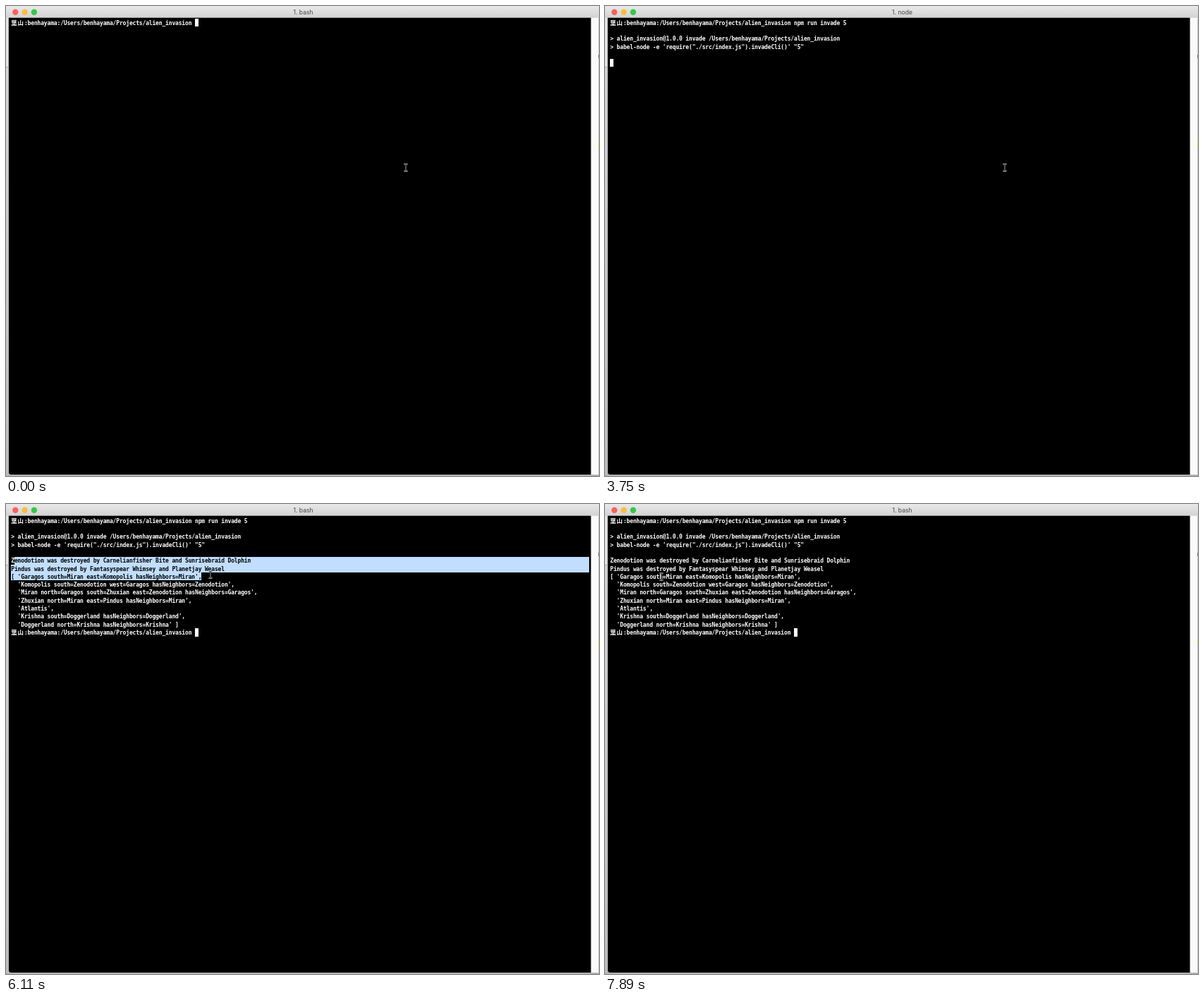
Animation of 841 by 666 pixels, one loop 8000 ms. Source, as an HTML page with a canvas:

```html
<!DOCTYPE html>
<html lang="en">
<head>
<meta charset="utf-8">
<title>Terminal</title>
<style>
  html, body { margin: 0; width: 100%; height: 100%; overflow: hidden; background: #ccc; }
  canvas { display: block; }
</style>
</head>
<body>
<canvas id="stage" width="841" height="666"></canvas>
<script>
const ctx = document.getElementById('stage').getContext('2d');
const LOOP = 8000;
const LEFT = 7.3, TOP = 17.9, CELL = 4.655, ROW = 11.32, RIGHT = 827;
const USER = 'benhayama';
const PATH = `/Users/${USER}/Projects/alien_invasion`;
const PROMPT = `葉山:${USER}:${PATH} `;
const COMMAND = 'npm run invade 5';

const banner = [
  '',
  `> alien_invasion@1.0.0 invade ${PATH}`,
  `> babel-node -e 'require("./src/index.js").invadeCli()' "5"`,
  ''
];
const result = [
  'Zenodotion was destroyed by Carnelianfisher Bite and Sunrisebraid Dolphin',
  'Pindus was destroyed by Fantasyspear Whimsey and Planetjay Weasel',
  "[ 'Garagos south=Miran east=Komopolis hasNeighbors=Miran',",
  "  'Komopolis south=Zenodotion west=Garagos hasNeighbors=Zenodotion',",
  "  'Miran north=Garagos south=Zhuxian east=Zenodotion hasNeighbors=Garagos',",
  "  'Zhuxian north=Miran east=Pindus hasNeighbors=Miran',",
  "  'Atlantis',",
  "  'Krishna south=Doggerland hasNeighbors=Doggerland',",
  "  'Doggerland north=Krishna hasNeighbors=Krishna' ]",
  PROMPT
];

// Pointer stops: time, x, y
const stops = [
  [0, 567, 229], [4200, 567, 240], [4340, 545, 234], [4490, 330, 150],
  [4640, 110, 92], [4780, 30, 76], [4930, 14, 79], [5080, 12, 81],
  [5520, 40, 81], [5670, 100, 83], [5820, 174, 84], [5960, 240, 92],
  [6110, 290, 100], [6260, 310, 103], [6410, 320, 99], [6550, 321, 95.5],
  [6700, 321, 94], [7740, 180, 100], [7890, 80, 103]
];

const isWide = ch => ch > '\u2fff';
const colX = col => Math.min(RIGHT, Math.round(LEFT + col * CELL));
const rowY = row => Math.round(TOP + row * ROW);

function screenLines(t) {
  if (t < 600) return [PROMPT];
  if (t < 1050) return [PROMPT + COMMAND.slice(0, 8)];
  const lines = [PROMPT + COMMAND];
  if (t < 3150) return lines;
  if (t < 3450) return [...lines, ''];
  if (t < 4050) return [...lines, ...banner, ''];
  return [...lines, ...banner, ...result];
}

function pointerAt(t) {
  const i = stops.findLastIndex(s => s[0] <= t);
  const [, x, y] = stops[i];
  const [, px, py] = stops[Math.max(0, i - 1)];
  // The selection trails slightly behind the pointer
  const lag = (a, b) => a + (b - a) * 0.17;
  return { x, y, dragX: lag(x, px), dragY: lag(y, py) };
}

function selectionAt(t, pointer, lines) {
  if (t < 5520 || t >= 7300) return null;
  const row = Math.floor((pointer.dragY - TOP) / ROW);
  const col = Math.floor((pointer.dragX - LEFT) / CELL);
  return { row, col: col > lines[row].length ? Infinity : col };
}

function selectedRange(sel, row) {
  if (!sel || row < 5 || row > sel.row) return [0, 0];
  return [row === 5 ? 1 : 0, row === sel.row ? sel.col : Infinity];
}

function rect(color, x, y, w, h) {
  ctx.fillStyle = color;
  ctx.fillRect(x, y, w, h);
}

function cells(color, row, from, to) {
  const x = colX(from), y = rowY(row);
  rect(color, x, y, colX(to) - x, rowY(row + 1) - y);
}

function gradient(y0, y1, from, to) {
  const g = ctx.createLinearGradient(0, y0, 0, y1);
  g.addColorStop(0, from);
  g.addColorStop(1, to);
  return g;
}

function drawWindow(title) {
  rect('#d2d2d2', 0, 0, 841, 666);
  rect('#e4e4e4', 0, 0, 4, 86);
  rect('#aaa', 0, 86, 4, 1);
  rect(gradient(87, 666, '#d4d4d4', '#bcbcbc'), 0, 87, 4, 579);
  rect('#b4b4b4', 3, 16, 1, 648);
  rect('#b4b4b4', 0, 664, 841, 2);
  rect('#c9c9c9', 840, 16, 1, 648);
  rect('#777', 840, 69, 1, 5);
  rect('#e8cf3c', 840, 193, 1, 7);
  ctx.fillStyle = '#000';
  ctx.beginPath();
  ctx.roundRect(4, 10, 830, 654, [0, 0, 0, 3]);
  ctx.fill();
  rect('#fafafa', 829.6, 16, 10.4, 648);
  rect(gradient(0, 16, '#e9e9e9', '#d3d3d3'), 0, 0, 841, 16.7);
  ['#fc605b', '#fdbc40', '#34c84a'].forEach((color, i) => {
    ctx.fillStyle = color;
    ctx.beginPath();
    ctx.arc(13.3 + i * 13.3, 8.7, 4.2, 0, 7);
    ctx.fill();
  });
  ctx.fillStyle = '#444';
  ctx.font = '8.6px Inter, sans-serif';
  ctx.textAlign = 'center';
  ctx.fillText(title, 421.5, 12);
  ctx.textAlign = 'left';
}

function drawLine(text, row, [from, to]) {
  if (to > from) cells('#c1deff', row, from, to);
  let col = 0;
  for (const ch of text) {
    const wide = isWide(ch);
    ctx.font = wide
      ? 'bold 8.4px "Noto Sans CJK JP", "Noto Sans CJK", sans-serif'
      : 'bold 8px "DejaVu Sans Mono", monospace';
    ctx.fillStyle = col >= from && col < to ? '#000' : '#fff';
    ctx.fillText(ch, LEFT + col * CELL, TOP + row * ROW + 8.7);
    col += wide ? 2 : 1;
  }
  return col;
}

function drawPointer({ x, y }) {
  const beam = new Path2D(
    `M${x - 2.5} ${y - 5}q2.5 0 2.5 2v6q0 2 -2.5 2M${x + 2.5} ${y - 5}q-2.5 0 -2.5 2v6q0 2 2.5 2`);
  for (const [color, width] of [['#c8c8c8', 2], ['#111', 0.8]]) {
    ctx.strokeStyle = color;
    ctx.lineWidth = width;
    ctx.stroke(beam);
  }
}

function draw(t) {
  const lines = screenLines(t);
  const pointer = pointerAt(t);
  const sel = selectionAt(t, pointer, lines);
  drawWindow(t >= 3750 && t < 4050 ? '1. node' : '1. bash');
  let end = 0;
  lines.forEach((text, row) => { end = drawLine(text, row, selectedRange(sel, row)); });
  cells('#fff', lines.length - 1, end, end + 1);
  drawPointer(pointer);
}

const start = performance.now();
function tick() {
  draw((performance.now() - start) % LOOP);
  requestAnimationFrame(tick);
}
tick();
</script>
</body>
</html>
```
